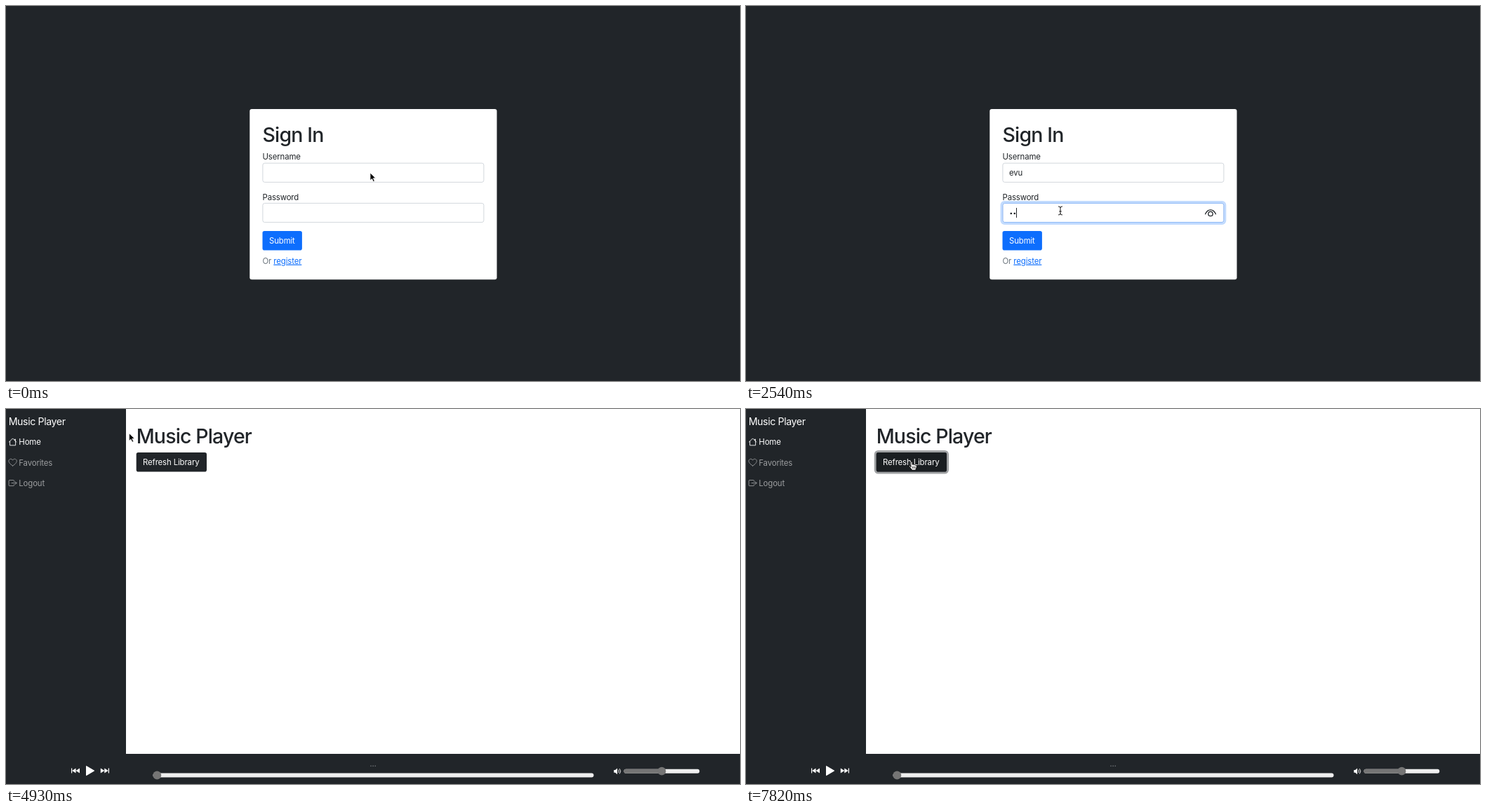
Animation of 1046 by 535 pixels, one loop 8000 ms. Source, as an HTML page:

```html
<!DOCTYPE html>
<html lang="en">
<head>
<meta charset="utf-8">
<title>Sign in and library</title>
<style>
  html, body { margin: 0; width: 100%; height: 100%; overflow: hidden; background: #212529; }
  svg { display: block; width: 100vw; height: 100vh; }
  text { font: 400 11.4px Inter, "Liberation Sans", sans-serif; font-optical-sizing: none; letter-spacing: -.13px; fill: #212529; }
  .h1 { font-size: 28.5px; font-weight: 500; letter-spacing: -.85px; }
  .brand { font-size: 14.2px; letter-spacing: -.4px; fill: #fff; }
  .light { fill: #fff; }
  .field { fill: #fff; stroke: #ced4da; stroke-width: .9; }
  .focus .halo { fill: none; stroke: #c2dbfe; stroke-width: 3; }
  .focus .edge { fill: none; stroke: #86b7fe; stroke-width: .9; }
  .nav text { fill: #fff; }
  .nav path { fill: none; stroke: #fff; stroke-width: 1.2; stroke-linecap: round; stroke-linejoin: round; }
  .ink { fill: none; stroke: #212529; stroke-width: 1.3; stroke-linecap: round; }
</style>
</head>
<body>
<svg viewBox="0 0 1046 535" preserveAspectRatio="none">
  <rect width="1046" height="535" fill="#212529"/>

  <g id="login">
    <rect x="347.3" y="147" width="352.2" height="243.3" rx="3" fill="#fff"/>
    <text class="h1" x="365.5" y="193.6">Sign In</text>
    <text x="365.5" y="219.4">Username</text>
    <text x="365.5" y="276.6">Password</text>
    <rect class="field" x="365.9" y="224.2" width="315" height="27.2" rx="2.8"/>
    <rect class="field" x="365.9" y="281.4" width="315" height="27.2" rx="2.8"/>
    <g id="userFocus" class="focus">
      <rect class="halo" x="364" y="222.3" width="318.8" height="31" rx="4.3"/>
      <rect class="edge" x="365.9" y="224.2" width="315" height="27.2" rx="2.8"/>
    </g>
    <g id="passFocus" class="focus">
      <rect class="halo" x="364" y="279.5" width="318.8" height="31" rx="4.3"/>
      <rect class="edge" x="365.9" y="281.4" width="315" height="27.2" rx="2.8"/>
    </g>
    <text id="user" x="375" y="242"></text>
    <g id="dots" fill="#212529">
      <circle cx="377.8" cy="296" r="1.35"/>
      <circle cx="382.8" cy="296" r="1.35"/>
      <circle cx="387.8" cy="296" r="1.35"/>
    </g>
    <g id="eye" class="ink">
      <path d="M654.6 296.8C658 288.800 666 288.800 669.400 296.800"/>
      <circle cx="662" cy="296.500" r="3.200"/>
    </g>
    <rect id="caret" width="1" height="14" fill="#212529"/>
    <rect id="submitRing" x="364" y="319.4" width="59.4" height="30.6" rx="4.3" fill="none" stroke="#98c1fe" stroke-width="3"/>
    <rect x="365.500" y="320.900" width="56.400" height="27.600" rx="2.800" fill="#0d6efd"/>
    <rect id="submitDark" x="365.500" y="320.900" width="56.400" height="27.600" rx="2.800" fill="#0b5ed7"/>
    <text class="light" x="375" y="339">Submit</text>
    <text x="365.500" y="367.700" style="fill:#6c757d">Or <tspan fill="#0d6efd" text-decoration="underline">register</tspan></text>
  </g>

  <g id="player">
    <rect x="171" width="875" height="492" fill="#fff"/>
    <text class="brand" x="3.700" y="23">Music Player</text>
    <g id="home" class="nav">
      <path transform="translate(3.700 41.200) scale(.735)" d="M1 8 8 1l7 7M2.500 6.800v7.700h11V6.800M12 4.500V2.500h1.200v3.200"/>
      <text x="18.300" y="51.300">Home</text>
    </g>
    <g id="favs" class="nav">
      <path transform="translate(3.700 70.400) scale(.735)" d="M8 14.500C-4 7 .5 1 4.500 1.200 6.500 1.300 7.500 2.700 8 3.700 8.500 2.700 9.500 1.300 11.500 1.200 15.500 1 20 7 8 14.500z"/>
      <text x="18.300" y="80.500">Favorites</text>
    </g>
    <g class="nav" opacity=".55">
      <path transform="translate(3.700 99.700) scale(.735)" d="M10.500 5V3.500q0-1-1-1h-8q-1 0-1 1v9q0 1 1 1h8q1 0 1-1V11M6 8h9.500m-3-3 3 3-3 3"/>
      <text x="18.300" y="109.800">Logout</text>
    </g>
    <text class="h1" x="185.700" y="49">Music Player</text>
    <rect id="libRing" x="184.200" y="60.400" width="103.300" height="30.700" rx="4.300" fill="none" stroke="#a0a2a4" stroke-width="3"/>
    <rect x="185.700" y="61.900" width="100.300" height="27.700" rx="2.800" fill="#212529"/>
    <rect id="libDark" x="185.700" y="61.900" width="100.300" height="27.700" rx="2.800" fill="#1a1e21"/>
    <text class="light" x="195" y="80">Refresh Library</text>

    <g fill="#fff">
      <path d="M93 512.500h1.200v7H93zM99.500 512.500v7l-5.300-3.500zM105 512.500v7l-5.500-3.500z"/>
      <path d="M114.500 509.500v13.200l11.200-6.600z" stroke="#fff" stroke-linejoin="round"/>
      <path d="M147 512.500h-1.200v7h1.200zM140.300 512.500v7l5.400-3.500zM134.800 512.500v7l5.500-3.500z"/>
      <path d="M866.300 514.900h1.900l2.900-2.500v8.800l-2.900-2.500h-1.900z"/>
      <path d="M872.600 514.700q1.600 2.100 0 4.200M874.300 513.200q3 3.600 0 7.200" fill="none" stroke="#fff" stroke-width=".9"/>
    </g>
    <g fill="#8b8f93">
      <circle cx="520" cy="509.300" r=".7"/>
      <circle cx="523.100" cy="509.300" r=".7"/>
      <circle cx="526.200" cy="509.300" r=".7"/>
    </g>
    <rect x="209.500" y="519.600" width="628" height="5.900" rx="2.950" fill="#efefef"/>
    <circle cx="215.300" cy="522.500" r="5.900" fill="#757575"/>
    <rect x="880.500" y="513.800" width="107.800" height="5.900" rx="2.950" fill="#efefef"/>
    <rect x="880.500" y="513.800" width="54" height="5.900" rx="2.950" fill="#757575"/>
    <circle cx="934.500" cy="516.700" r="5.900" fill="#757575"/>
  </g>

  <g id="pointer">
    <path id="arrow" d="M0 0v10.800l2.500-2.300 1.900 4.100 1.900-.8-1.900-4.100h3.400z" fill="#000" stroke="#fff" stroke-width=".8"/>
    <g id="beam" fill="none" stroke-linecap="round">
      <path d="M-2.500-6q2.500 0 2.500 1.800q0-1.800 2.500-1.800M0-4.200v8.400M-2.500 6q2.500 0 2.500-1.800q0 1.800 2.500 1.800M-1.300 1h2.600" stroke="#fff" stroke-width="2"/>
      <path d="M-2.500-6q2.500 0 2.500 1.800q0-1.800 2.500-1.800M0-4.200v8.400M-2.500 6q2.500 0 2.500-1.800q0 1.800 2.500 1.800M-1.300 1h2.600" stroke="#111" stroke-width="1"/>
    </g>
    <g id="hand" stroke="#000" stroke-width=".9" stroke-linejoin="round" stroke-linecap="round">
      <path d="M-1.100 7.500V.9Q-1.100-.1 0-.1T1.100.9v3.300q1.700-.8 2.200.5 1.600-.6 2.100.6 1.900-.4 1.900 1.300 0 2.600-1.300 4.200v1.400H0V11Q-2 9.300-3.500 6.800-3.900 5.500-2.700 5.400-1.900 5.500-1.100 7.500z" fill="#fff"/>
      <path d="M1.400 7.200v2.300M3.200 7.200v2.300M5 7.200v2.300" fill="none" stroke-width=".7"/>
    </g>
  </g>
</svg>
<script>
const LOOP = 8000, START = 500, TICK = 88.2, NAME = 'evu';
const el = {};
document.querySelectorAll('[id]').forEach(n => el[n.id] = n);

// Pointer hot spot: time, x, y
const path = [
  [410, 519, 238], [505, 506, 237], [590, 485, 236], [680, 477, 236],
  [1660, 477, 236], [1840, 466, 258], [2010, 448, 292],
  [2800, 448, 292], [2980, 431, 315], [3150, 408, 335], [3240, 405, 337],
  [4220, 405, 337], [4490, 332, 205], [4660, 265, 88], [4840, 212, 30],
  [4930, 165, 36], [5010, 124, 72], [5100, 105, 98],
  [5280, 52, 77], [5370, 44, 73], [5630, 44, 73], [5810, 40, 52], [5880, 39, 48],
  [6060, 39, 48], [6230, 110, 72], [6400, 235, 115], [6480, 258, 121],
  [6580, 258, 121], [6750, 205, 108], [6840, 160, 75], [6930, 162, 38],
  [7020, 205, 25], [7110, 262, 30], [7190, 284, 56], [7280, 252, 77], [7360, 236, 75]
];

function locate(t) {
  const i = path.findIndex(k => k[0] > t);
  if (i === 0) return path[0].slice(1);
  if (i < 0) return path[path.length - 1].slice(1);
  const [a, ax, ay] = path[i - 1], [b, bx, by] = path[i];
  const p = (t - a) / (b - a);
  return [ax + (bx - ax) * p, ay + (by - ay) * p];
}

const between = (t, a, b) => t >= a && t < b;
const count = (t, times) => times.filter(s => t >= s).length;
const show = (node, on) => node.style.display = on ? '' : 'none';
const fade = (node, v) => node.setAttribute('opacity', v);

function shape(t, x, y) {
  const inside = (l, top, r, b) => x >= l && x <= r && y >= top && y <= b;
  if (t < 500) return 'arrow';
  if (t < 3860) {
    if (inside(366, 224, 681, 252) || inside(366, 281, 681, 309)) return 'beam';
    return inside(366, 321, 422, 349) ? 'hand' : 'arrow';
  }
  if (t < 4310 || inside(186, 62, 286, 90) || inside(0, 36, 67, 115)) return 'hand';
  return inside(186, 22, 350, 58) ? 'beam' : 'arrow';
}

function draw(t) {
  const q = t < START ? t : START + Math.floor((t - START + 5) / TICK) * TICK;
  const ramp = s => Math.min(1, Math.max(0, (q - s + 70) / 150));
  const span = (a, b) => t < a ? 0 : ramp(a) * (t < b ? 1 : 1 - ramp(b));
  const login = t < 3860;
  const [x, y] = locate(q);
  const kind = shape(t, x, y);

  show(el.login, login);
  show(el.player, !login);
  el.pointer.setAttribute('transform', `translate(${x} ${y})`);
  for (const k of ['arrow', 'beam', 'hand']) show(el[k], k === kind);

  const typed = count(t, [1400, 1480, 1660]);
  const masked = count(t, [2360, 2540, 2800]);
  el.user.textContent = NAME.slice(0, typed);
  [...el.dots.children].forEach((d, i) => show(d, i < masked));
  show(el.eye, between(t, 2360, 3600));
  fade(el.userFocus, span(680, 2100));
  fade(el.passFocus, span(2100, 3600));

  const inUser = t < 2100;
  show(el.caret, between(t, 680, 1130) || between(t, 1400, 3330));
  el.caret.setAttribute('x', inUser ? 375 + 6.6 * typed : 375 + 5 * masked);
  el.caret.setAttribute('y', inUser ? 230.5 : 288);
  fade(el.submitDark, span(3150, 3860));
  fade(el.submitRing, span(3600, 3860));

  const onFavs = between(t, 5630, 6060);
  fade(el.home, onFavs ? .55 + .2 * span(5800, 6060) : 1);
  fade(el.favs, onFavs ? 1 : .55 + .2 * span(5280, 5630));
  const overLib = kind === 'hand' && x > 186 && y < 90;
  fade(el.libDark, !login && overLib ? 1 : 0);
  fade(el.libRing, span(7730, LOOP));
}

function frame() {
  draw(performance.now() % LOOP);
  requestAnimationFrame(frame);
}
frame();
</script>
</body>
</html>
```
